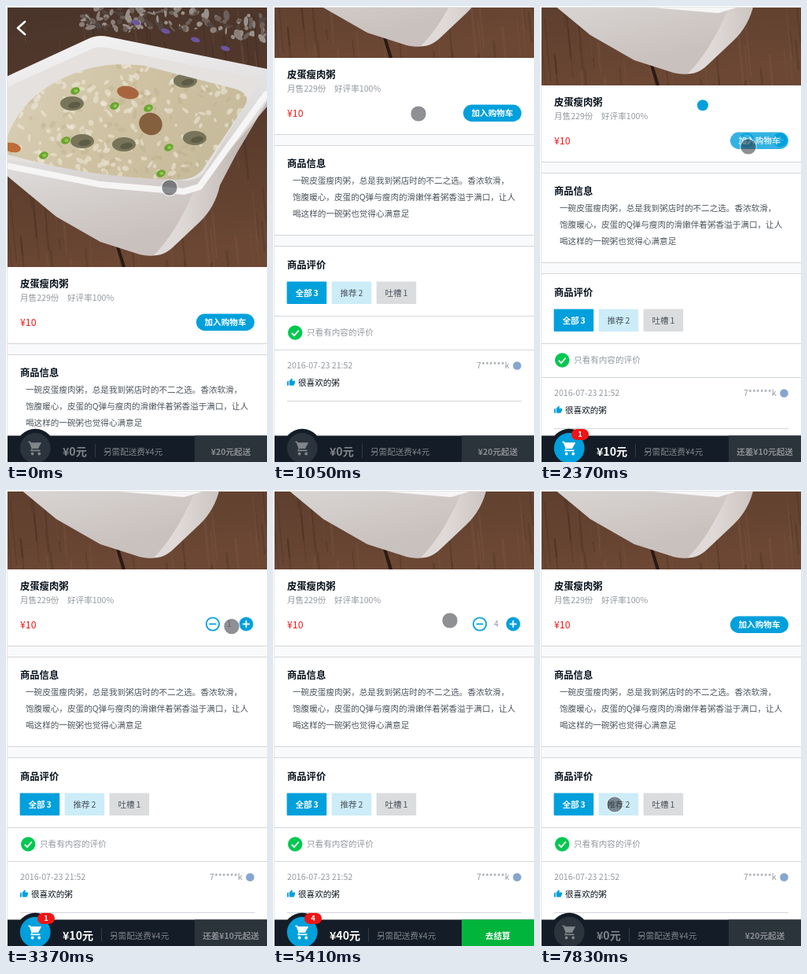
Recreate the animation shown at these times as an HTML page with a canvas. Size 332x580 px, loop 8000 ms.

```html
<!DOCTYPE html>
<html lang="zh">
<head>
<meta charset="utf-8">
<style>
html, body { margin: 0; width: 100%; height: 100%; overflow: hidden; background: #fff; }
canvas { display: block; width: 332px; height: 580px; }
</style>
</head>
<body>
<canvas id="stage"></canvas>
<script>
const W = 332, H = 580, LOOP = 8000;
const STEP = 261, LEAD = 40; // the screen refreshes once per step
const FONT = '"Noto Sans CJK SC", "Noto Sans CJK", sans-serif';
const BLUE = '#00a0dc', INK = '#07111b', GREY = '#93999f', BODY = '#4d555d', RED = '#f01414';
const SMALL = 10.6, MEDIUM = 12.3, LARGE = 14.1;

// Steps at which the cart is tapped up and down
const ADDS = [9, 15, 16, 17], REMOVES = [23, 24, 25, 27];

// Pointer stops: step, x, y
const STOPS = [[0, 208, 231], [1, 208, 363], [2, 180, 162], [4, 185, 137], [8, 265, 179], [12, 265, 179],
  [14, 309, 168], [18, 309, 168], [21, 183, 165], [22, 265, 170], [27, 265, 170], [29, 91, 399], [30, 95, 400]];

const CART = new Path2D('M1 2h3l1 2h16l-5 9H7.5l-1.3 2H19v2H4l2-4L2.6 4H1z');
const THUMB = new Path2D('M1 21h4V9H1zM23 10c0-1-1-2-2-2h-6l1-5-2-2-7 7v11c0 1 1 2 2 2h9c1 0 2-1 2-1l3-7z');

const canvas = document.getElementById('stage');
const dpr = window.devicePixelRatio || 1;
canvas.width = W * dpr;
canvas.height = H * dpr;
let c = canvas.getContext('2d');

const easeOut = p => 1 - (1 - Math.min(1, Math.max(0, p))) ** 3;

// A flick past the end of the list, then a spring back
function scrollAt(t) {
  return 266 * easeOut((t - 265) / 779) - 35 * easeOut((t - 1044) / 783);
}

function pointerAt(k) {
  const i = Math.max(1, STOPS.findIndex(s => s[0] >= k));
  const [k0, x0, y0] = STOPS[i - 1], [k1, x1, y1] = STOPS[i];
  const p = (k - k0) / (k1 - k0);
  return [x0 + (x1 - x0) * p, y0 + (y1 - y0) * p];
}

function countAt(k) {
  const past = taps => taps.filter(s => s <= k).length;
  return past(ADDS) - past(REMOVES);
}

function box(x, y, w, h, color, r = 0) {
  c.fillStyle = color;
  c.beginPath();
  c.roundRect(x, y, w, h, r);
  c.fill();
}
function blob(x, y, rx, ry, turn, color) {
  c.fillStyle = color;
  c.beginPath();
  c.ellipse(x, y, rx, ry, turn, 0, 7);
  c.fill();
}
const dot = (x, y, r, color) => blob(x, y, r, r, 0, color);
function ring(x, y, r, color, width) {
  c.strokeStyle = color;
  c.lineWidth = width;
  c.beginPath();
  c.arc(x, y, r, 0, 7);
  c.stroke();
}
function line(points, color, width) {
  c.strokeStyle = color;
  c.lineWidth = width;
  c.beginPath();
  points.forEach(p => c.lineTo(...p));
  c.stroke();
}
function shape(path, color) {
  c.fillStyle = color;
  c.fill(new Path2D(path));
}
function icon(path, x, y, scale, color) {
  c.save();
  c.translate(x, y);
  c.scale(scale, scale);
  c.fillStyle = color;
  c.fill(path);
  c.restore();
}
// y is the middle of the glyphs
function text(s, x, y, size, color, weight = 400, align = 'left') {
  c.font = `${weight} ${size}px ${FONT}`;
  c.textAlign = align;
  c.fillStyle = color;
  c.fillText(s, x, y + size * 0.37);
}
function ramp(x0, y0, x1, y1, ...colors) {
  const g = c.createLinearGradient(x0, y0, x1, y1);
  colors.forEach((k, i) => g.addColorStop(i / (colors.length - 1), k));
  return g;
}
function seeded(seed) {
  return () => (seed = (seed * 16807) % 2147483647) / 2147483647;
}

function paintTable(rnd) {
  box(0, 0, W, W, ramp(0, 0, 40, W, '#4a352b', '#573a2b', '#6b4734'));
  for (let i = 0; i < 170; i++) {
    const x = rnd() * 400 - 40, y = rnd() * W, n = 20 + rnd() * 60;
    line([[x, y], [x + n * 0.1, y + n]], i % 2 ? 'rgba(35,20,14,.16)' : 'rgba(160,118,92,.13)', 1 + rnd() * 2);
  }
  line([[137, 290], [150, W]], '#2b1a14', 4);
  // dried flowers
  for (let i = 0; i < 150; i++) {
    const x = 95 + rnd() * 237, y = rnd() * 30 + (x > 260 ? 12 : 0);
    blob(x, y, 2 + rnd() * 5, 1 + rnd() * 3, rnd() * 3, ['#6c6059', '#8b8079', '#514641', '#9b918b'][i % 4]);
  }
  for (let i = 0; i < 4; i++) blob(165 + i * 38, 21 + i * 11, 6, 3, 0.3, '#6d55a0');
}

function paintBowl() {
  shape('M0 90L104 42Q116 36 130 39L332 80V122L294 186 272 228Q266 256 246 275L212 307Q196 322 170 316L120 300 64 268 0 215Z',
    ramp(0, 60, 60, 320, '#f3f2f2', '#dfdddd', '#c9c1bd'));
  shape('M238 238L332 128V122L294 186 272 228Q266 256 246 275L212 307Q200 318 188 317Q215 290 238 238Z',
    ramp(220, 0, 300, 0, '#dfdad8', '#c2b8b3'));
  shape('M0 104L108 55Q116 51 128 53L318 92Q326 95 318 104L252 212Q244 222 226 222L0 196Z', '#e4e1df');
  line([[0, 203], [120, 227], [226, 236], [246, 230], [331, 112]], '#f6f5f5', 8);
}

function paintPorridge(rnd) {
  c.save();
  c.clip(new Path2D('M0 170Q22 108 92 84Q128 70 176 76L290 105Q314 112 303 128L250 208Q240 221 218 221Q100 218 0 188Z'));
  box(0, 60, W, 170, ramp(40, 80, 240, 225, '#d8ceb5', '#cfc2a2', '#c6bb9b'));
  for (let i = 0; i < 330; i++) {
    blob(rnd() * 310, 75 + rnd() * 145, 2 + rnd() * 4, 1.5 + rnd() * 2, rnd() * 3,
      i % 3 ? 'rgba(240,235,218,.55)' : 'rgba(178,166,132,.3)');
  }
  for (const [x, y] of [[84, 124], [228, 95], [240, 168], [97, 172], [150, 176]]) {
    blob(x, y, 15, 9, 0, '#77745a');
    blob(x + 3, y + 2, 8, 4, -0.2, '#5f5c46');
  }
  blob(155, 110, 14, 8, 0.2, '#a8653d');
  blob(184, 150, 15, 14, 0.5, '#85603e');
  blob(8, 180, 11, 6, 0.2, '#bd6c35');
  for (const [x, y] of [[88, 108], [138, 127], [181, 130], [76, 171], [48, 190], [207, 180], [197, 213]]) {
    blob(x, y, 6, 4.5, -0.4, '#69a52d');
    blob(x + 1, y, 2.5, 2, 0, '#95c653');
  }
  c.restore();
}

const PHOTO_SCALE = 2;
function makePhoto() {
  const page = c, cv = document.createElement('canvas'), rnd = seeded(77);
  cv.width = cv.height = W * PHOTO_SCALE;
  c = cv.getContext('2d');
  c.scale(PHOTO_SCALE, PHOTO_SCALE);
  c.lineJoin = c.lineCap = 'round';
  paintTable(rnd);
  paintBowl();
  paintPorridge(rnd);
  line([[24, 20], [15, 28], [24, 36]], '#fff', 2.6);
  c = page;
  return cv;
}

function rule(y, x = 2, w = 330) { box(x, y, w, 1, '#d3d6d9'); }
function gap(y) {
  box(2, y, 330, 14, '#f9fafb');
  rule(y);
  rule(y + 14);
}

function tab(x, label, n, fill, color, weight) {
  box(x - 0.4, 616.5, 50.6, 28.5, fill, 1);
  text(label, x + 10.5, 631, SMALL, color, weight);
  text(n, x + 33.5, 631, SMALL, color, weight);
}

function buyButton(alpha) {
  c.globalAlpha = alpha;
  box(242, 391.5, 74, 21.5, BLUE, 10.7);
  text('加入购物车', 279, 402, SMALL, '#fff', 700, 'center');
  c.globalAlpha = 1;
}

function stepper(n) {
  ring(263, 401.5, 8.2, BLUE, 1.8);
  box(258.5, 400.6, 9, 1.8, BLUE);
  text(n, 284, 401.5, SMALL, GREY, 400, 'center');
  dot(305.5, 401.5, 9, BLUE);
  box(301, 400.6, 9, 1.8, '#fff');
  box(304.6, 397, 1.8, 9, '#fff');
}

function content(k, n) {
  const s = PHOTO_SCALE;
  c.drawImage(photo, 2 * s, 2 * s, 330 * s, 330 * s, 2, 2, 330, 330);
  box(2, 332, 330, 460, '#fff');
  text('皮蛋瘦肉粥', 18, 353, MEDIUM, INK, 700);
  text('月售229份', 18, 371, SMALL, GREY);
  text('好评率100%', 78, 371, SMALL, GREY);
  text('¥10', 18, 402, MEDIUM, RED);
  if (n) stepper(n);
  if (!n || k === ADDS[0]) buyButton(n ? 0.8 : 1);

  gap(429);
  text('商品信息', 18, 466.5, MEDIUM, INK, 700);
  ['一碗皮蛋瘦肉粥，总是我到粥店时的不二之选。香浓软滑，',
    '饱腹暖心，皮蛋的Q弹与瘦肉的滑嫩伴着粥香溢于满口，让人',
    '喝这样的一碗粥也觉得心满意足'].forEach((s, i) => text(s, 25, 488 + i * 21.1, SMALL, BODY));

  gap(557);
  text('商品评价', 18, 595.5, MEDIUM, INK, 700);
  tab(18, '全部', 3, BLUE, '#fff', 700);
  tab(75, '推荐', 2, '#ccecf8', BODY, 400);
  tab(132, '吐槽', 1, '#dadcde', BODY, 400);
  rule(660);
  dot(28.2, 681.5, 9.2, '#00c850');
  line([[23.8, 682], [27, 685.2], [32.8, 678.5]], '#fff', 1.9);
  text('只看有内容的评价', 43, 681.5, SMALL, GREY);
  rule(703);
  text('2016-07-23 21:52', 18, 723, SMALL, GREY);
  text('7******k', 300.5, 723, SMALL, GREY, 400, 'right');
  dot(310.5, 723.5, 5.3, '#86a6cf');
  icon(THUMB, 17.5, 739, 0.46, BLUE);
  text('很喜欢的粥', 32, 745, SMALL, INK);
  rule(768, 18, 298);
}

function cartBar(n) {
  const cost = n * 10, ready = cost >= 20, lit = n > 0;
  const tone = lit ? '#fff' : '#80858a';
  box(2, 546.5, 330, 34, '#141d27');
  dot(37.2, 562.4, 24.6, '#141d27');
  dot(37.2, 562.4, 19.4, lit ? BLUE : '#2b343c');
  icon(CART, 27.5, 552, 0.84, tone);
  dot(33.6, 569.5, 1.9, tone);
  dot(42.2, 569.5, 1.9, tone);
  if (lit) {
    box(40, 538, 22, 14, RED, 7);
    text(n, 51, 545, 9.4, '#fff', 700, 'center');
  }
  text(`¥${cost}元`, 72, 567, LARGE, tone, 700);
  const x = lit ? 121 : 113;
  box(x, 557, 1, 17, '#333b43');
  text('另需配送费¥4元', x + 11, 567, SMALL, '#80858a');
  box(240, 546.5, 92, 34, ready ? '#00b43c' : '#2b333b');
  const label = ready ? '去结算' : lit ? `还差¥${20 - cost}元起送` : '¥20元起送';
  text(label, 286, 567, SMALL, ready ? '#fff' : '#8a8f94', 700, 'center');
}

// Linear in x; y follows cubic-bezier(.49, -.29, .75, .41), so it rises before it drops.
function toss(x, y, p) {
  const curve = (a, b, u) => 3 * (1 - u) ** 2 * u * a + 3 * (1 - u) * u * u * b + u ** 3;
  let lo = 0, hi = 1;
  for (let i = 0; i < 24; i++) {
    const mid = (lo + hi) / 2;
    if (curve(0.49, 0.75, mid) < p) lo = mid; else hi = mid;
  }
  return [x + (42 - x) * p, y + (550 - y) * curve(-0.29, 0.41, lo)];
}

// The button throws a full ball; the plus sign only leaves a pale trace.
function balls(k) {
  const p = 0.207 + (k - ADDS[0]) * STEP / 400;
  if (p > 0 && p < 1) dot(...toss(250, 153, p), 7, BLUE);
  if (ADDS.indexOf(k) > 0) {
    const [x, y] = toss(298, 148, 0.156);
    box(x - 7, y - 7, 14, 14, '#d2effc');
  }
}

function pointer(k) {
  const [x, y] = pointerAt(k);
  dot(x, y, 9.8, 'rgba(50,52,60,.55)');
  ring(x, y, 10.3, 'rgba(255,255,255,.6)', 1.1);
}

function draw(now) {
  const k = Math.floor((now % LOOP + LEAD) / STEP);
  const n = countAt(k);
  c.setTransform(dpr, 0, 0, dpr, 0, 0);
  box(0, 0, W, H, '#fff');
  c.save();
  c.beginPath();
  c.rect(2, 2, 330, 578);
  c.clip();
  c.translate(0, -Math.round(scrollAt(k * STEP)));
  content(k, n);
  c.restore();
  box(1, 1, 1, 579, '#e4e6e8');
  box(1, 1, 331, 1, '#e4e6e8');
  cartBar(n);
  balls(k);
  pointer(k);
}

const photo = makePhoto();
const start = performance.now();
function loop() {
  draw(performance.now() - start);
  requestAnimationFrame(loop);
}
loop();
</script>
</body>
</html>
```
